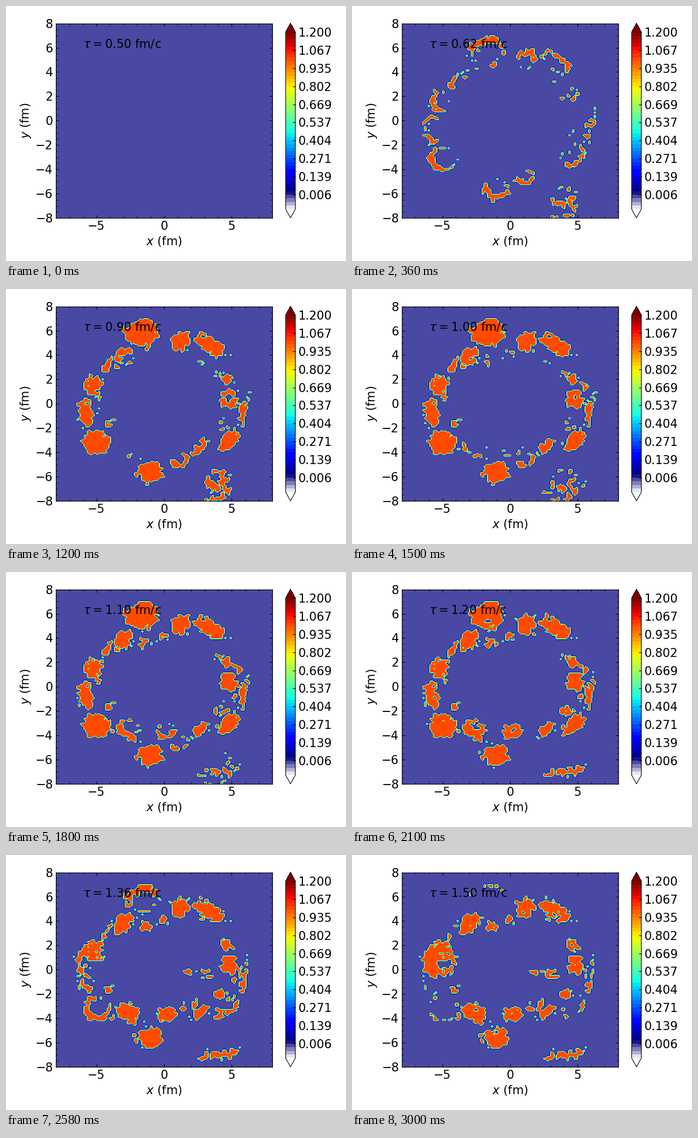
Write a matplotlib script that moves like this. It is 600x450 px and loops after 3.06 s.

```python
import numpy as np
import matplotlib.pyplot as plt
from matplotlib.animation import FuncAnimation
from matplotlib.cm import ScalarMappable
from matplotlib.colors import BoundaryNorm, ListedColormap
from matplotlib.ticker import AutoMinorLocator, MultipleLocator

W, H, N = 600, 450, 121
STEPS, INTERVAL = 51, 60
LEFT, BOTTOM, WIDTH, HEIGHT = 87.9, 76.02, 382, 343.4
GROW, DECAY, OFFSET = 14, 18, 0.35
plt.rcParams.update({"font.family": "DejaVu Sans", "font.size": 15})

axis = np.linspace(-8, 8, N)
X, Y = np.meshgrid(axis, axis)
rng = np.random.default_rng(4)


def ragged():
    """Noise of about one cell, smoothed over its neighbours."""
    n = rng.normal(size=(N, N))
    return 0.06 * sum(np.roll(n, s, (0, 1)) for s in ((0, 0), (1, 0), (0, 1), (1, 1)))


noise = ragged(), ragged()

# Hot spots (x, y, half-size along the ring, half-size across it) in fm,
# grouped by the steps at which they start to fill and to empty
groups = {
    (1, 33): [(-1.7, 5.85, 1.3, 1.05), (4.8, -3, 0.9, 0.55), (-5, -3.2, 0.95, 1),
              (-5.8, -0.7, 1.05, 0.6), (5.85, -0.45, 1.05, 0.25), (-3.95, 3.25, 0.8, 0.3)],
    (1, 13): [(1.2, -4.7, 0.65, 0.4), (3.9, -6.25, 0.85, 0.7), (4, -7.5, 0.9, 0.5)],
    (1, 46): [(1.15, 5.05, 0.6, 0.85), (3.4, 4.8, 1.25, 0.6), (4.65, 2.1, 0.42, 0.35),
              (-1.05, -5.6, 0.95, 0.8), (-5.2, 1.6, 0.8, 0.6)],
    (12, 50): [(2.6, -3.55, 0.65, 0.42), (-2.2, -4.45, 0.4, 0.22), (-4.1, -1.65, 0.25, 0.35),
               (-3.05, 3.8, 1.05, 0.62), (4.85, 0.45, 0.8, 0.55)],
    (24, 50): [(0.2, -3.7, 0.7, 0.62), (-2.65, -3.5, 0.85, 0.65), (-1.25, 3.55, 0.35, 0.45),
               (-0.05, 4.05, 0.27, 0.35), (4.2, -2.05, 0.4, 0.45)],
    (24, 46): [(x, -7.6 + 0.16 * x, 0.35, 0.25) for x in np.arange(3, 5.3, 0.3)],
    (40, 60): [(-5.25, 0.7, 1.4, 1.2), (2.7, -0.35, 0.28, 0.65), (1.9, -3.05, 0.6, 0.3)],
}
spots = [(*s, *life) for life, group in groups.items() for s in group]

# Short-lived crumbs scattered along the ring
for _ in range(40):
    a, r, born = rng.uniform(0, 2 * np.pi), rng.normal(1, 0.08), rng.uniform(-8, 48)
    spots.append((5.2 * r * np.cos(a), 4.6 * r * np.sin(a), 0.17, 0.17, max(born, 1), born))


def spot(t, x, y, along, across, born, fade):
    """Distance to an ellipse lying along the ring, with a void on its inner side.

    The void closes as the spot fills and opens again as it empties.
    """
    void = max(1 - (t - born) / GROW, (t - fade) / DECAY)
    if void > 1:
        return np.full(X.shape, 9.0)
    r = np.hypot(x, y)
    p = ((Y - y) * x - (X - x) * y) / r / along
    q = ((X - x) * x + (Y - y) * y) / r / across
    body = np.hypot(p, q) - 1
    hole = np.hypot(p, q + OFFSET) - (1 + OFFSET) * max(void, -0.5)
    return np.maximum(body, -hole) * min(along, across)


def field(t):
    if t == 0:
        return np.zeros((N, N))
    d = np.min([spot(t, *s) for s in spots], axis=0)
    turn = np.pi / 2 * t / STEPS
    rough = noise[0] * np.cos(turn) + noise[1] * np.sin(turn)
    return (d < rough).astype(float)


def shade(f):
    """White to navy over the first tenth, then jet."""
    if f < 0.1:
        return tuple(1 - f / 0.1 * np.array([1, 1, 0.5]))
    return plt.cm.jet((f - 0.1) / 0.9)[:3]


levels = np.linspace(-0.1, 1.2, 50)
cmap = ListedColormap([shade((i + 0.5) / 49) for i in range(49)])
cmap = cmap.with_extremes(under="white", over=(0.5, 0, 0))
norm = BoundaryNorm(levels, 49)


def place(x, width):
    return fig.add_axes([x / W, BOTTOM / H, width / W, HEIGHT / H])


fig = plt.figure(figsize=(W / 100, H / 100), dpi=100, facecolor="white")
ax = place(LEFT, WIDTH)
ax.set(xlim=(-8, 8), ylim=(-8, 8), xlabel="$x$ (fm)", ylabel="$y$ (fm)")
for side, step in ((ax.xaxis, 5), (ax.yaxis, 2)):
    side.set_major_locator(MultipleLocator(step))
    side.set_minor_locator(AutoMinorLocator())
ax.tick_params(which="both", direction="in", top=True, right=True)

bar = fig.colorbar(ScalarMappable(norm, cmap), cax=place(493.5, 17.1), extend="both",
                   ticks=levels[4::5], format="%.3f")
bar.minorticks_off()
bar.ax.tick_params(direction="in")

label = ax.text(-6, 6, "")
plot = None


def update(i):
    global plot
    if plot is not None:
        plot.remove()
    plot = ax.contourf(axis, axis, field(i), levels, cmap=cmap, norm=norm, extend="both")
    label.set_text(rf"$\tau = {0.5 + 0.02 * i:.2f}$ fm/c")
    return []


anim = FuncAnimation(fig, update, frames=STEPS, interval=INTERVAL, repeat=True,
                     repeat_delay=0, init_func=lambda: [])
plt.show()
```
